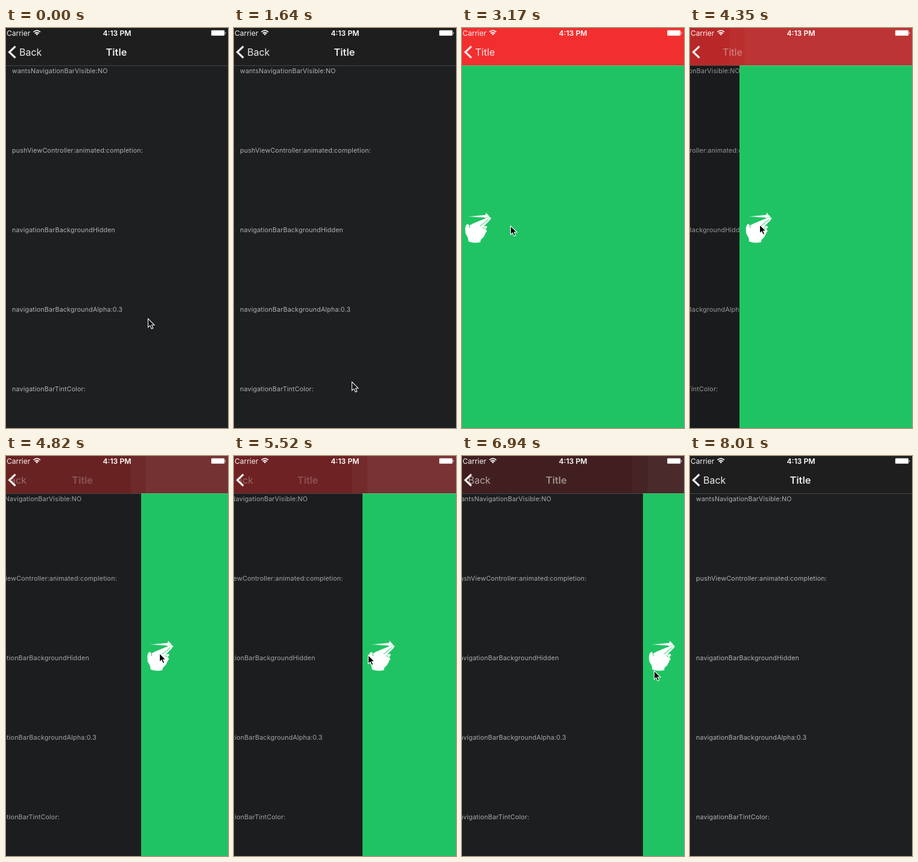
An HTML page that plays this animation: 368x664 px, repeating every 8.6 s.

```html
<!DOCTYPE html>
<html lang="en">
<head>
<meta charset="utf-8">
<title>Navigation bar transition</title>
<style>
  html, body { margin: 0; width: 100%; height: 100%; overflow: hidden; background: #1e1f21; }
  svg { display: block; width: 368px; height: 664px; font-family: Inter, Roboto, sans-serif; fill: #fff; }
  #list text { font-size: 10.7px; letter-spacing: .17px; fill: #b2b2b3; }
  .nav { font-size: 16px; }
  .bold { font-weight: 600; }
  #title { font-size: 16.4px; }
</style>
</head>
<body>
<svg viewBox="0 0 368 664">
  <defs><clipPath id="label"><path d="M9 20H368V62H9z"/></clipPath></defs>

  <rect width="368" height="664" fill="#1e1f21"/>
  <g id="list"></g>
  <rect id="dim" width="368" height="664" fill="#000"/>

  <rect id="page" y="62" width="368" height="602" fill="#20c363"/>
  <g id="hand" stroke="#20c363" stroke-width=".5" stroke-linejoin="round">
    <path d="M9 313 39 310 39.500 306 49 316.500 43 320 38 315z"/>
    <path d="M40 315.500Q45 312 47 315.500Q48 318 45 320.500L36 329.500Q41 327 42 330Q42 332 39 334Q43 336 40 339L36 347 31 352V355.500Q21 358.500 10.500 354.500L9.500 348 5.500 341 5 333Q6 325 10 325L12 327.500 19 324 31 319z"/>
    <path d="M44 317.500 30 329M12 327.500 12.500 332M34 331 38 334" fill="none" stroke-width="1"/>
  </g>

  <rect id="bar" width="368" height="62"/>
  <g id="blur">
    <rect width="368" height="62" fill="#000" opacity=".08"/>
    <rect id="soft" width="400" height="62" opacity=".04"/>
    <rect id="clear" width="400" height="62" opacity=".04"/>
  </g>
  <rect y="62" width="368" height="1" opacity=".17"/>

  <g opacity=".9">
    <g clip-path="url(#label)"><text id="back" class="nav" y="46">Back</text></g>
    <text id="title" class="bold" y="46">Title</text>
    <text id="thin" class="nav" y="46">Title</text>
    <path d="M15.500 30.500 5.500 40 15.500 49.500" fill="none" stroke="#fff" stroke-width="3.200"/>
  </g>

  <text x="1" y="12.500" font-size="12" opacity=".95">Carrier</text>
  <g fill="none" stroke="#fff" stroke-width="1.700">
    <path d="M45.500 6.700Q51.200 1.500 56.900 6.700M47.700 9Q51.200 6 54.700 9"/>
    <path d="M49.200 10 51.200 12.300 53.200 10Q51.200 8.600 49.200 10z" fill="#fff" stroke="none"/>
  </g>
  <text class="bold" x="184" y="12.500" font-size="12.200" text-anchor="middle">4:13 PM</text>
  <rect x="340" y="3.500" width="22.500" height="9.500" rx="1.500" opacity=".6"/>
  <rect x="340.700" y="4.200" width="21" height="8.100" rx="1"/>
  <path d="M363.300 6.500Q365.500 8.300 363.300 10.200z"/>

  <path id="cursor" d="M.5.500V14.800L3.800 11.800 6.300 17.300 8.800 16.300 6.500 11H11z" fill="#000" stroke="#fff" stroke-width="1.100"/>
</svg>

<script>
const LOOP = 8600, TICK = 117.5, WIDTH = 368;
const PUSH = 14, DRAG = 33, DONE = 63, GONE = 68; // in ticks
const $ = id => document.getElementById(id);
const mix = (a, b, p) => a + (b - a) * p;

$('list').innerHTML = [
  'wantsNavigationBarVisible:NO',
  'pushViewController:animated:completion:',
  'navigationBarBackgroundHidden',
  'navigationBarBackgroundAlpha:0.3',
  'navigationBarTintColor:'
].map((s, i) => `<text x="10" y="${74.5 + 132 * i}">${s}</text>`).join('');

// Eases through stops of the form [tick, x, y].
function glide(stops, k) {
  const i = stops.findIndex(s => s[0] > k);
  if (i < 0) return stops[stops.length - 1].slice(1);
  const a = stops[i - 1], b = stops[i], t = (k - a[0]) / (b[0] - a[0]);
  return a.slice(1).map((v, n) => mix(v, b[n + 1], t * t * (3 - 2 * t)));
}

// The swipe goes right, back left, then all the way.
const swipe = [[DRAG, 0], [44, 274], [51.2, 112], [DONE, WIDTH]];
const pointer = [
  [0, 235, 482], [PUSH, 195, 587], [16, 195, 587], [24, 119, 327], [25, 119, 327],
  [30.2, 0, 329], [DRAG, 20, 325], [56, 230, 332], [DONE, 318, 393], [67, 352, 556]
];

function edgeAt(k) {
  if (k < DRAG) return WIDTH * Math.min(1, Math.exp(-1.7 * (k - PUSH)));
  return glide(swipe, k)[0];
}

// While dragging, the page trails the pointer a little.
function pointerAt(k) {
  const [x, y] = glide(pointer, k);
  const dragging = k >= DRAG && k < DONE;
  return [dragging ? Math.min(318, edgeAt(k + 0.35) + 20.5) : x, y];
}

const set = (id, name, value) => $(id).setAttribute(name, value);
const move = (id, x, y = 0) => set(id, 'transform', `translate(${x} ${y})`);

function draw(time) {
  const k = Math.floor((time % LOOP + 8) / TICK);
  const edge = edgeAt(k), p = edge / WIDTH, q = 1 - p;

  move('list', -110.4 * q);
  set('dim', 'opacity', 0.18 * q);
  set('page', 'x', Math.round(edge));
  move('hand', edge + Math.min(edge, 5));

  const rgb = [[242, 30], [47, 30], [47, 31]].map(([a, b]) => Math.round(mix(a, b, p)));
  set('bar', 'fill', `rgb(${rgb})`);
  set('blur', 'opacity', 4 * p * q);
  set('soft', 'x', edge - 17);
  set('clear', 'x', edge + 8);

  const titleX = mix(22, 165.5, p);
  set('back', 'x', 22 - 65 * q);
  set('back', 'opacity', p * p);
  set('title', 'x', titleX);
  set('title', 'opacity', p ** 3);
  set('thin', 'x', titleX);
  set('thin', 'opacity', q ** 3);

  move('cursor', ...pointerAt(k).map(Math.round));
  set('cursor', 'visibility', k < GONE ? 'visible' : 'hidden');
}

const start = performance.now();
function frame() {
  draw(performance.now() - start);
  requestAnimationFrame(frame);
}
frame();
</script>
</body>
</html>
```
